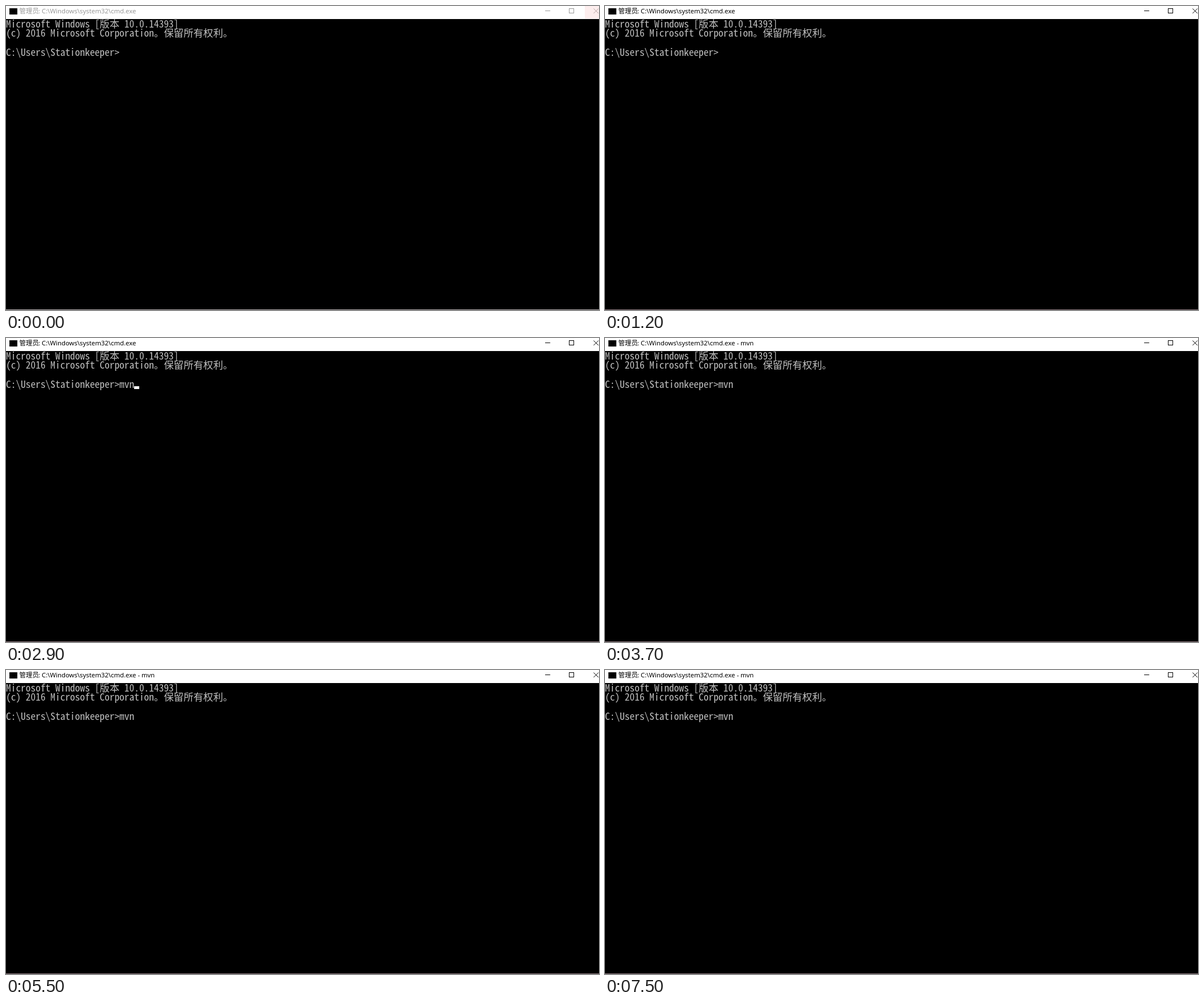
An HTML page with a canvas that plays this animation: 1046x536 px, repeating every 8000 ms.

```html
<!DOCTYPE html>
<html lang="zh-CN">
<head>
<meta charset="utf-8">
<title>Console</title>
<style>
  html, body { margin: 0; width: 100%; height: 100%; overflow: hidden; background: #000; }
  canvas { display: block; }
</style>
</head>
<body>
<canvas id="stage" width="1046" height="536"></canvas>
<script>
const ctx = document.getElementById('stage').getContext('2d');
const W = 1046, H = 536, LOOP = 8000;
const CELL = 8.7, ROW = 16.75, BASE = 37.6;
const MONO = '17.4px "Noto Sans Mono CJK SC", "Noto Sans Mono", "Noto Sans CJK SC", monospace';
const UI = '11.35px "Noto Sans", "Noto Sans CJK SC", sans-serif';
const UI_CJK = '11.5px "Noto Sans CJK SC", "Noto Sans CJK", sans-serif';

const PROMPT = 'C:\\Users\\Stationkeeper>';
const TYPED = 'mvn';
const KEYS = [2200, 2700, 2900];
const ENTER = 3500, RUNNING = 3600, FOCUS = 400;
// The cursor starts hidden and flips at each of these times.
const BLINKS = [800, 1200, 1700, 2600, 2700, 3200, 3500, 3700,
                4100, 4600, 5000, 5500, 6000, 6500, 7000, 7500];

const passed = (times, t) => times.filter(x => t >= x).length;

function rect(color, x, y, w, h) {
  ctx.fillStyle = color;
  ctx.fillRect(x, y, w, h);
}

// Writes on the console grid; CJK characters take two cells.
function print(text, row) {
  ctx.font = MONO;
  ctx.fillStyle = '#c0c0c0';
  ctx.textAlign = 'center';
  let x = 0;
  for (const ch of text) {
    const wide = ch > '\u2fff';
    const w = wide ? CELL * 2 : CELL;
    ctx.fillText(ch, x + w / 2, BASE + row * ROW);
    x += w;
  }
}

function line(x1, y1, x2, y2) {
  ctx.beginPath();
  ctx.moveTo(x1, y1);
  ctx.lineTo(x2, y2);
  ctx.stroke();
}

function titleBar(t) {
  const active = t >= FOCUS;
  const ink = active ? '#000' : '#999';
  rect('#fff', 0, 0, W, 23);
  rect('#000', 6, 4, 14, 11);

  ctx.textAlign = 'left';
  ctx.fillStyle = ink;
  ctx.font = UI_CJK;
  ctx.fillText('管理员', 23.5, 13);
  ctx.font = UI;
  const task = t >= RUNNING ? ' - ' + TYPED : '';
  ctx.fillText(': C:\\Windows\\system32\\cmd.exe' + task, 57, 13);

  const fading = t < 100;
  if (fading) rect('#fdeeee', 1021, 0, 25, 22);
  ctx.lineWidth = 1;
  ctx.strokeStyle = ink;
  line(951, 8.5, 960, 8.5);
  ctx.strokeRect(993.5, 4.5, 8, 8);
  if (fading) ctx.strokeStyle = '#b9a3a3';
  line(1036.5, 4.5, 1045, 13);
  line(1036.5, 13, 1045, 4.5);
}

function cursor(t, typed) {
  if (passed(BLINKS, t) % 2 === 0) return;
  if (t >= ENTER) return rect('#fff', 0, 102, 8, 4);
  const col = PROMPT.length + typed;
  const x = Math.round(col * CELL);
  rect('#fff', x, 85, Math.round((col + 1) * CELL) - x, 5);
}

function draw(t) {
  const typed = passed(KEYS, t);
  rect('#000', 0, 0, W, H);
  print('Microsoft Windows [版本 10.0.14393]', 0);
  print('(c) 2016 Microsoft Corporation。保留所有权利。', 1);
  print(PROMPT + TYPED.slice(0, typed), 3);
  cursor(t, typed);
  titleBar(t);
  rect(t >= FOCUS ? '#8f7a80' : '#b8b0b2', 0, H - 1, W, 1);
}

const start = performance.now();
function tick() {
  draw((performance.now() - start) % LOOP);
  requestAnimationFrame(tick);
}
tick();
</script>
</body>
</html>
```
